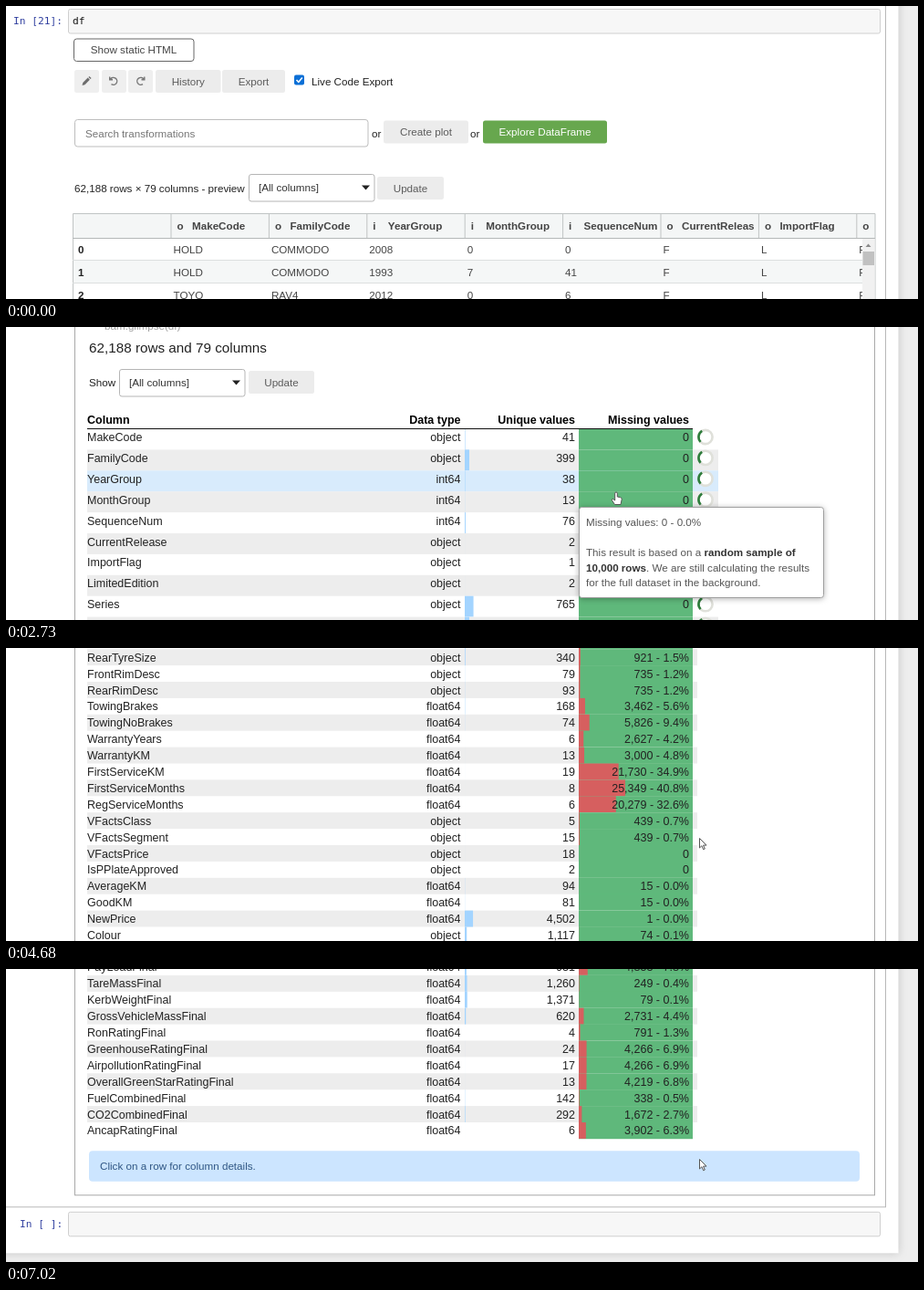
Animation of 1000 by 321 pixels, one loop 8450 ms. Source, as an HTML page:

```html
<!DOCTYPE html>
<html lang="en">
<head>
<meta charset="utf-8">
<title>Data frame exploration</title>
<style>
html, body { margin: 0; width: 100%; height: 100%; overflow: hidden; background: #eee; }
svg { display: block; width: 100vw; height: 100vh; font-family: "Liberation Sans", Arial, sans-serif; }
text { white-space: pre; }
.page { filter: drop-shadow(0 0 5px rgba(87, 87, 87, .28)); }
.tip { filter: drop-shadow(0 1px 3px rgba(0, 0, 0, .3)); }
</style>
</head>
<body>
<svg id="stage" viewBox="0 0 1000 321"></svg>
<script>
const LOOP = 8450, STEP = 130, TOTAL = 62188, SAMPLE = 10000;
const ROW_TOP = 293.5, ROW = 17.9, ROW_BUSY = 22.9;
const UI = 11.65, BODY = 12.5;
const MONO = '"DejaVu Sans Mono", "Liberation Mono", monospace';
const GREEN = '#5fb87b', RED = '#d65f5f', BLUE = '#a3d4ff', STRIPE = '#ededed', LINE = '#a9a9a9';

// name, type, unique values, missing values (none when left out)
const COLUMNS = `MakeCode o 41
FamilyCode o 399
YearGroup i 38
MonthGroup i 13
SequenceNum i 76
CurrentRelease o 2
ImportFlag o 1
LimitedEdition o 2
Series o 765
SeriesPublic o 402
BadgeDescription o 980
BadgeSecondary o 214
BodyStyle o 17
BodyConfig o 24
WheelBaseConfig o 6
Roofline o 9
ExtraIdentification o 88
DriveDescription o 5
GearType o 9
GearLocation o 4
GearNum f 10 37
DoorNum f 5 12
EngineSize f 290 15
EngineDescription f 71 15
Cylinders f 9 15
FuelType o 10
Induction o 7
OptionCategory o 3
CamDescription o 6
EngineType o 5
FuelDelivery o 8
DeliveryMethod o 6
Power f 261 140
PowerRPMTo f 79 151
Torque f 338 275
TorqueRPMTo f 86 319
SeatCapacity f 12 36
BuildCountryOriginDescription o 31
ValvesCylinder f 4 513
EngineCycleDescription o 2
EngineConfigurationDescription o 11 1866
EngineLocation o 4 12
FrontTyreSize o 317 921
RearTyreSize o 340 921
FrontRimDesc o 79 735
RearRimDesc o 93 735
TowingBrakes f 168 3462
TowingNoBrakes f 74 5826
WarrantyYears f 6 2627
WarrantyKM f 13 3000
FirstServiceKM f 19 21730
FirstServiceMonths f 8 25349
RegServiceMonths f 6 20279
VFactsClass o 5 439
VFactsSegment o 15 439
VFactsPrice o 18
IsPPlateApproved o 2
AverageKM f 94 15
GoodKM f 81 15
NewPrice f 4502 1
Colour o 1117 74
Branch o 21
SaleCategory o 6
Age_Comp_Months f 291 60
KM f 52065 4
Sold_Amount f 3690
FuelUrbanFinal f 202 1759
FuelExtraurbanFinal f 108 2430
PayLoadFinal f 931 4853
TareMassFinal f 1260 249
KerbWeightFinal f 1371 79
GrossVehicleMassFinal f 620 2731
RonRatingFinal f 4 791
GreenhouseRatingFinal f 24 4266
AirpollutionRatingFinal f 17 4266
OverallGreenStarRatingFinal f 13 4219
FuelCombinedFinal f 142 338
CO2CombinedFinal f 292 1672
AncapRatingFinal f 6 3902`.split('\n').map(line => {
  const [name, type, unique, missing = 0] = line.split(' ');
  return { name, type: { o: 'object', f: 'float64', i: 'int64' }[type], unique: +unique, missing: +missing };
});

const stage = document.getElementById('stage');

function add(parent, tag, attrs = {}) {
  const node = document.createElementNS('http://www.w3.org/2000/svg', tag);
  for (const key in attrs) node.setAttribute(key, attrs[key]);
  return parent.appendChild(node);
}
const group = (parent, attrs) => add(parent, 'g', attrs);
const path = (parent, d, attrs) => add(parent, 'path', { d, fill: 'none', ...attrs });

function box(parent, x1, y1, x2, y2, fill, attrs) {
  return add(parent, 'rect', { x: x1, y: y1, width: x2 - x1, height: y2 - y1, fill, ...attrs });
}

// y is the visual middle of the capitals
function label(parent, x, y, str, attrs = {}) {
  const size = attrs['font-size'] || UI;
  const node = add(parent, 'text', { x, y: y + size * .36, 'font-size': size, fill: '#222', ...attrs });
  node.textContent = str;
  return node;
}
const MID = { 'text-anchor': 'middle' }, END = { 'text-anchor': 'end' }, BOLD = { 'font-weight': 'bold' };

function button(parent, x1, y1, x2, y2, str, fill = '#ececec', ink = '#5c5c5c') {
  box(parent, x1, y1, x2, y2, fill, { rx: 2.5 });
  label(parent, (x1 + x2) / 2, (y1 + y2) / 2, str, { ...MID, fill: ink });
}

function select(parent, x, y) {
  box(parent, x + .5, y + .5, x + 138, y + 30, '#fff', { stroke: '#b5b5b5', rx: 2.5 });
  label(parent, x + 11, y + 14.5, '[All columns]', { fill: '#333' });
  path(parent, `M${x + 124} ${y + 12.5}h9l-4.5 5z`, { fill: '#222' });
}

function codeCell(parent, y, promptX, prompt, code) {
  const font = { 'font-family': MONO, 'font-size': 11.2 };
  label(parent, promptX, y + 13, prompt, { ...font, fill: '#303f9f' });
  box(parent, 68.5, y + .5, 958.5, y + 27, '#f7f7f7', { stroke: '#cfcfcf', rx: 2 });
  label(parent, 73, y + 13, code, { ...font, fill: '#111' });
}

function drawData(g) {
  for (const x of [75, 105, 134]) box(g, x, 70, x + 27, 95, '#efefef', { rx: 2.5 });
  path(g, 'M83.5 87l.8-3 5.4-5.400 2.200 2.200-5.400 5.400zM90.400 77.900l1-1 2.200 2.200-1 1z', { fill: '#6e6e6e' });
  const arrow = 'M-3.500 -2.500A4 4 0 1 1 -2.500 3.200M-4.300 -5v3.300h3.300';
  path(g, arrow, { stroke: '#777', 'stroke-width': 1.4, transform: 'translate(118 82.500)' });
  path(g, arrow, { stroke: '#777', 'stroke-width': 1.4, transform: 'translate(147.500 82.500) scale(-1 1)' });
  button(g, 164, 70, 235.5, 95, 'History');
  button(g, 237, 70, 306, 95, 'Export');
  box(g, 316, 75.5, 327, 86.5, '#0b6fd6', { rx: 2 });
  path(g, 'M318.500 81l2.300 2.400 4-5', { stroke: '#fff', 'stroke-width': 1.6 });
  label(g, 335, 83, 'Live Code Export');

  box(g, 75.5, 124.5, 397, 154, '#fff', { stroke: '#bdbdbd', rx: 3 });
  label(g, 87, 139.5, 'Search transformations', { fill: '#757575' });
  label(g, 401, 139.5, 'or');
  button(g, 414, 125.5, 507, 150.5, 'Create plot');
  label(g, 509, 139.5, 'or');
  button(g, 523, 125.5, 659, 150.5, 'Explore DataFrame', '#67a74e', '#fff');

  label(g, 75, 199.5, '62,188 rows × 79 columns - preview');
  select(g, 266, 184);
  button(g, 407, 187, 480, 212, 'Update');
  drawPreview(g);
}

function drawPreview(g) {
  const heads = ['o MakeCode', 'o FamilyCode', 'i YearGroup', 'i MonthGroup', 'i SequenceNum',
    'o CurrentReleas', 'o ImportFlag', 'o '];
  const rows = ['HOLD COMMODO 2008 0 0 F L F', 'HOLD COMMODO 1993 7 41 F L F', 'TOYO RAV4 2012 0 6 F L F'];
  const edge = i => 181 + i * 107.4;
  const bold = { ...BOLD, fill: '#444' };

  box(g, 73, 227, 953, 254, '#f4f6f6');
  box(g, 73, 278.5, 939, 303.5, '#f5f7f7');
  path(g, 'M73.500 321V227.500H953V321', { stroke: '#c0c4c4' });
  path(g, 'M73 254.500H953', { stroke: '#b4b8b8' });
  path(g, 'M73 278.500H939M73 303.500H939', { stroke: '#dcdfdf' });
  heads.forEach((head, i) => {
    const [kind, name] = head.split(' ');
    path(g, `M${edge(i)} 228V254`, { stroke: '#c0c4c4' });
    label(g, edge(i) + 6.5, 241, kind, bold);
    label(g, edge(i) + 23, 241, name, bold);
  });
  rows.forEach((row, r) => {
    const y = 266.5 + 25 * r;
    label(g, 79, y, r, { ...BOLD, fill: '#222' });
    row.split(' ').forEach((cell, i) => label(g, edge(i) + 2.5, y, cell, { fill: '#444' }));
  });
  box(g, 939, 255, 952.5, 321, '#f1f1f1');
  path(g, 'M942.500 264l3-3.500 3 3.500z', { fill: '#8a8a8a' });
  box(g, 939.5, 269, 952, 284, '#c1c1c1');
}

function drawTabs(g) {
  box(g, 73, 62, 953, 93, '#eee');
  box(g, 172.5, 63, 284, 93, '#fff');
  label(g, 87, 79.5, 'Data');
  label(g, 184, 79.5, 'Exploration');
  path(g, 'M261.500 75.500l7.500 7.500m0-7.500l-7.500 7.500', { stroke: '#444', 'stroke-width': 1.1 });
  label(g, 92, 115, 'bam.plot(df)', { fill: '#a0a0a0' });
}

function drawGlimpse(g) {
  box(g, 75.5, 153.5, 952.5, 1769.5, '#fff', { stroke: LINE });
  ['Predictor patterns', 'Correlation Matrix'].forEach((str, i) => {
    const x = 204 + 128 * i;
    box(g, x, 131.5, x + 127.5, 153.5, '#ececec', { stroke: LINE });
    label(g, x + 9, 143, str, { fill: '#808080' });
  });
  box(g, 75.5, 131.5, 203.5, 155, '#fff');
  path(g, 'M75.500 155V132M203.500 132V153.500', { stroke: LINE });
  path(g, 'M75 132H204', { stroke: '#2a8fdc', 'stroke-width': 1.6 });
  label(g, 85, 143, 'Glimpse');

  label(g, 108, 181, 'bam.glimpse(df)', { fill: '#a0a0a0' });
  label(g, 91, 204.5, '62,188 rows and 79 columns', { 'font-size': 15.25 });
  label(g, 91, 242.5, 'Show');
  select(g, 124, 228);
  button(g, 266, 230, 338, 255, 'Update');

  const head = { ...BOLD, 'font-size': BODY, fill: '#000' };
  label(g, 89, 283.5, 'Column', head);
  label(g, 498.5, 283.5, 'Data type', { ...head, ...END });
  label(g, 624, 283.5, 'Unique values', { ...head, ...END });
  label(g, 749, 283.5, 'Missing values', { ...head, ...END });

  box(g, 91, 1721, 936, 1754.5, '#cce5ff', { rx: 4 });
  label(g, 103, 1738, 'Click on a row for column details.', { fill: '#2f5683' });
}

// busy rows are taller, based on the sample, and carry a spinner
function drawRows(g, busy) {
  const height = busy ? ROW_BUSY : ROW, right = busy ? 781 : 758;
  const count = busy ? SAMPLE : TOTAL, spinners = [];
  const cell = { 'font-size': BODY, fill: '#222' };
  COLUMNS.forEach((col, i) => {
    const top = ROW_TOP + i * height, bottom = top + height, y = top + 9;
    const hovered = busy && i === 2;
    if (i % 2) box(g, 89, top, right, bottom, STRIPE);
    if (hovered) hoverRow = box(g, 89, top, right, bottom, '#d8ebfc');
    box(g, 503, top, 503 + 125 * Math.min(1, col.unique / count), bottom, BLUE);
    box(g, 628, top, 753, bottom + .3, GREEN);
    if (col.missing) box(g, 628, top, 628 + 125 * col.missing / TOTAL, bottom, RED);
    label(g, 89, y, col.name, cell);
    label(g, 498.5, y, col.type, { ...cell, ...END });
    label(g, 624, y, col.unique.toLocaleString('en-US'), { ...cell, ...END });
    const share = (100 * col.missing / TOTAL).toFixed(1);
    const missing = col.missing ? `${col.missing.toLocaleString('en-US')} - ${share}%` : '0';
    label(g, 749, y, missing, { ...cell, ...END });
    if (busy) {
      add(g, 'circle', { cx: 767, cy: y, r: 7.6, fill: '#fff', stroke: '#dfe0da', 'stroke-width': 2.6 });
      const arc = path(g, 'M0 -7.600A7.600 7.600 0 0 1 7.300 2', { stroke: '#2f7d3c', 'stroke-width': 2.6 });
      spinners.push({ arc, y });
    }
  });
  path(g, `M89 ${ROW_TOP}H753`, { stroke: '#111', 'stroke-width': 1.2 });
  return spinners;
}

function drawTip(g) {
  box(g, 628.5, 197.5, 896.5, 296.5, '#fff', { stroke: '#a0a0a0', rx: 3, class: 'tip' });
  const ink = { fill: '#555' };
  const strong = (node, str) => {
    const span = add(node, 'tspan', { ...BOLD, fill: '#333' });
    span.textContent = str;
    return node;
  };
  label(g, 636, 214, 'Missing values: 0 - 0.0%', ink);
  strong(label(g, 636, 247, 'This result is based on a ', ink), 'random sample of');
  const second = strong(label(g, 636, 263.5, '', ink), '10,000 rows');
  add(second, 'tspan').textContent = '. We are still calculating the results';
  label(g, 636, 280, 'for the full dataset in the background.', ink);
}

let hoverRow;
const doc = group(stage);
box(doc, -40, -60, 978.5, 1833, '#fff', { class: 'page' });
box(doc, -5, -50, 964.5, 1782.5, 'none', { stroke: '#b8b8b8' });
codeCell(doc, 3, 8, 'In [21]:', 'df');
codeCell(doc, 1787.5, 15, 'In [ ]:', '');
box(doc, 74.5, 36, 206, 60.5, '#fff', { stroke: '#666', rx: 3 });
label(doc, 140, 48, 'Show static HTML', { ...MID, fill: '#444' });

const dataView = group(doc), tabs = group(doc), glimpse = group(doc);
drawData(dataView);
drawTabs(tabs);
drawGlimpse(glimpse);
const busyRows = group(glimpse), doneRows = group(glimpse);
const spinners = drawRows(busyRows, true);
drawRows(doneRows, false);
const tip = group(stage);
drawTip(tip);

const pointer = group(stage);
const outline = { fill: '#fff', stroke: '#555', 'stroke-width': 1, 'stroke-linejoin': 'round' };
const arrowShape = path(pointer, 'M.500 .500V11l2.400-2.300 1.700 4 1.700-.700-1.700-3.900H8z', outline);
const handShape = path(pointer,
  'M-1.300 6V1.200Q-1.300 0 0 0T1.300 1.200V5L4.500 5.600Q6.300 6 6.200 7.800L5 13.500H-1.500L-4.600 8.800Q-5 7.500-3.600 7.400L-1.300 9z', outline);

// [time, value...] with straight motion between
const SCROLL = [[1690, 0], [2080, 182], [2860, 182], [3770, 862], [4160, 862], [4290, 912], [4810, 1112],
  [4940, 1112], [5200, 1163.5], [5980, 1163.5], [6370, 1265.3], [7020, 1521.7]];
const MOUSE = [[130, 604, 172], [390, 574, 130], [650, 573, 128], [2080, 573, 128], [2600, 668, 174],
  [2730, 669, 181], [2860, 669, 181], [3250, 760, 208]];

function at(keys, t) {
  const next = keys.findIndex(key => key[0] > t);
  if (next === 0) return keys[0].slice(1);
  if (next < 0) return keys[keys.length - 1].slice(1);
  const a = keys[next - 1], b = keys[next], k = (t - a[0]) / (b[0] - a[0]);
  return a.slice(1).map((v, i) => v + (b[i + 1] - v) * k);
}

const show = (node, on) => node.setAttribute('visibility', on ? 'inherit' : 'hidden');
const within = (t, from, to) => t >= from && t < to;

function render(time) {
  const t = Math.floor((time % LOOP) / STEP) * STEP;
  const [scroll] = at(SCROLL, t), [x, y] = at(MOUSE, t);
  doc.setAttribute('transform', `translate(0 ${-scroll})`);

  show(dataView, t < 650);
  show(tabs, t >= 650);
  show(glimpse, t >= 910);
  show(busyRows, t < 3640);
  show(doneRows, t >= 3640);
  show(tip, within(t, 2600, 2860));
  show(hoverRow, within(t, 2600, 2860));

  const turn = (t - 1300) * 585 / 1430;
  for (const s of spinners) s.arc.setAttribute('transform', `translate(767 ${s.y}) rotate(${turn})`);

  const hand = within(t, 390, 650) || within(t, 2470, 3250);
  show(pointer, t >= 130);
  show(handShape, hand);
  show(arrowShape, !hand);
  pointer.setAttribute('transform', `translate(${x} ${y})`);
}

const start = performance.now();
function tick() {
  render(performance.now() - start);
  requestAnimationFrame(tick);
}
tick();
</script>
</body>
</html>
```
